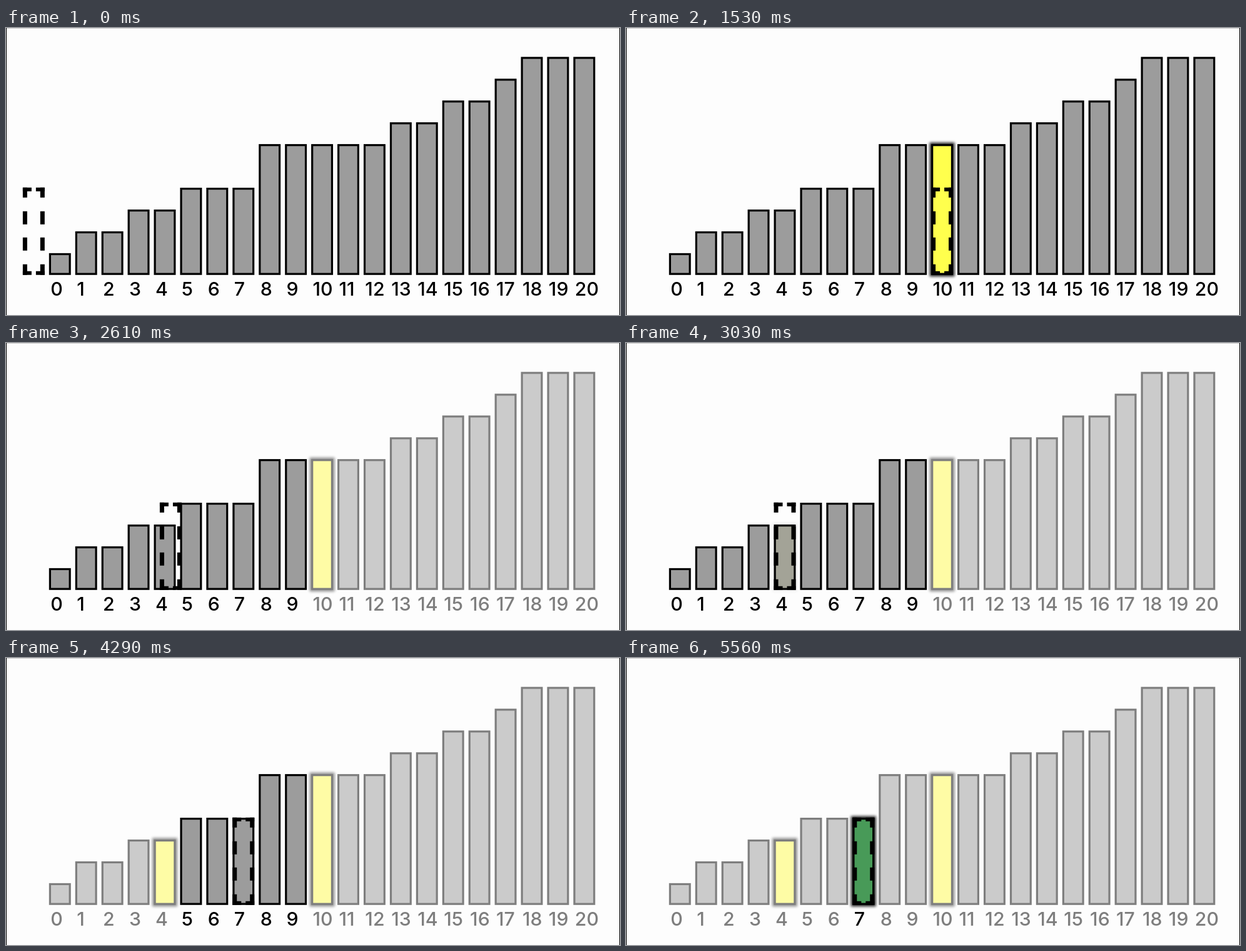
Write an HTML page that moves like this. It is 982 px wide and 460 px high and loops after 6.03 s.

```html
<!DOCTYPE html>
<html lang="en">
<head>
<meta charset="utf-8">
<title>Binary search</title>
<style>
html, body { margin: 0; width: 100%; height: 100%; overflow: hidden; background: #fdfdfd; }
svg { display: block; width: 982px; height: 460px; }
text { font: 500 30.3px Inter, "Liberation Sans", sans-serif; }
</style>
</head>
<body>
<svg id="stage" viewBox="0 0 982 460">
  <defs>
    <filter id="blur" x="-60%" y="-20%" width="220%" height="140%"><feGaussianBlur stdDeviation="2.3"/></filter>
  </defs>
</svg>
<script>
const LOOP = 6030;
const LEFT = 68.8, PITCH = 41.93, UNIT = 34.95, BASE = 395.8, LINE = 3.2;
const values = [1, 2, 2, 3, 3, 4, 4, 4, 6, 6, 6, 6, 6, 7, 7, 8, 8, 9, 10, 10, 10];
const BAR = [156, 156, 156], YELLOW = [255, 255, 77], GREEN = [72, 154, 88];
const DIM_BAR = [203, 203, 203], DIM_YELLOW = [254, 252, 165];

// Each probe glides to a bar, which is then marked.
const moves = [
  { at: 710, dur: 600, from: -1, to: 10 },
  { at: 2350, dur: 600, from: 10, to: 4 },
  { at: 4010, dur: 340, from: 4, to: 7 }
];
const marks = {
  10: { at: 1375, dur: 155, color: YELLOW },
  4: { at: 3020, dur: 165, color: YELLOW },
  7: { at: 4605, dur: 135, color: GREEN }
};

const stage = document.getElementById("stage");
const clamp = v => Math.max(0, Math.min(1, v));
const mix = (a, b, p) => `rgb(${a.map((v, i) => Math.round(v + (b[i] - v) * p))})`;
const barX = i => LEFT + PITCH * i;

function add(parent, name, attrs) {
  const el = document.createElementNS("http://www.w3.org/2000/svg", name);
  for (const key in attrs) el.setAttribute(key, attrs[key]);
  parent.appendChild(el);
  return el;
}

// cubic-bezier(0.19, 1, 0.22, 1)
function ease(x) {
  if (x <= 0 || x >= 1) return clamp(x);
  let lo = 0, hi = 1;
  for (let k = 0; k < 24; k++) {
    const s = (lo + hi) / 2, r = 1 - s;
    if (3 * r * r * s * 0.19 + 3 * r * s * s * 0.22 + s ** 3 < x) lo = s;
    else hi = s;
  }
  return 1 - (1 - lo) ** 3;
}

function dimTime(i) {
  if (i >= 10) return 1880;
  if (i <= 4) return 3520;
  return i === 7 ? Infinity : 5090;
}

const bars = values.map((value, i) => {
  const x = barX(i), h = value * UNIT, y = BASE - h;
  const glow = marks[i] && add(stage, "rect", {
    x: x - 2.5, y: y - 2.5, width: UNIT + 5, height: h + 5, fill: "#000", filter: "url(#blur)"
  });
  const box = add(stage, "rect", {
    x: x + LINE / 2, y: y + LINE / 2, width: UNIT - LINE, height: h - LINE, "stroke-width": LINE
  });
  const label = add(stage, "text", { x: x + 2.4, y: 429.4 });
  label.textContent = i;
  return { glow, box, label };
});

const probe = add(stage, "g", { stroke: "#000", fill: "none" });
for (const x of [3.5, UNIT - 3.5])
  add(probe, "path", { d: `M${x} 0V140`, "stroke-width": 7, "stroke-dasharray": "16 22 21 21 21 22 17" });
for (const y of [3, 137])
  add(probe, "path", { d: `M0 ${y}H${UNIT}`, "stroke-width": 6, "stroke-dasharray": "14 7 14" });

add(stage, "path", { d: "M0 .5H982", stroke: "#ccc" });
add(stage, "path", { d: "M.5 0V460M981.5 0V460", stroke: "#000" });

function draw(t) {
  bars.forEach(({ glow, box, label }, i) => {
    const dim = t >= dimTime(i), mark = marks[i];
    const p = mark ? clamp((t - mark.at) / mark.dur) : 0;
    const fill = dim ? mix(DIM_BAR, DIM_YELLOW, p) : mix(BAR, mark ? mark.color : BAR, p);
    box.setAttribute("fill", fill);
    box.setAttribute("stroke", dim ? "#7e7e7e" : "#000");
    label.setAttribute("fill", dim ? "#7e7e7e" : "#000");
    if (glow) glow.setAttribute("opacity", p * (dim ? 0.42 : 0.85));
  });
  let pos = -1;
  for (const m of moves)
    if (t >= m.at) pos = m.from + (m.to - m.from) * ease((t - m.at) / m.dur);
  probe.setAttribute("transform", `translate(${barX(pos)} ${BASE - 140})`);
}

function tick() {
  draw(performance.now() % LOOP);
  requestAnimationFrame(tick);
}
tick();
</script>
</body>
</html>
```
